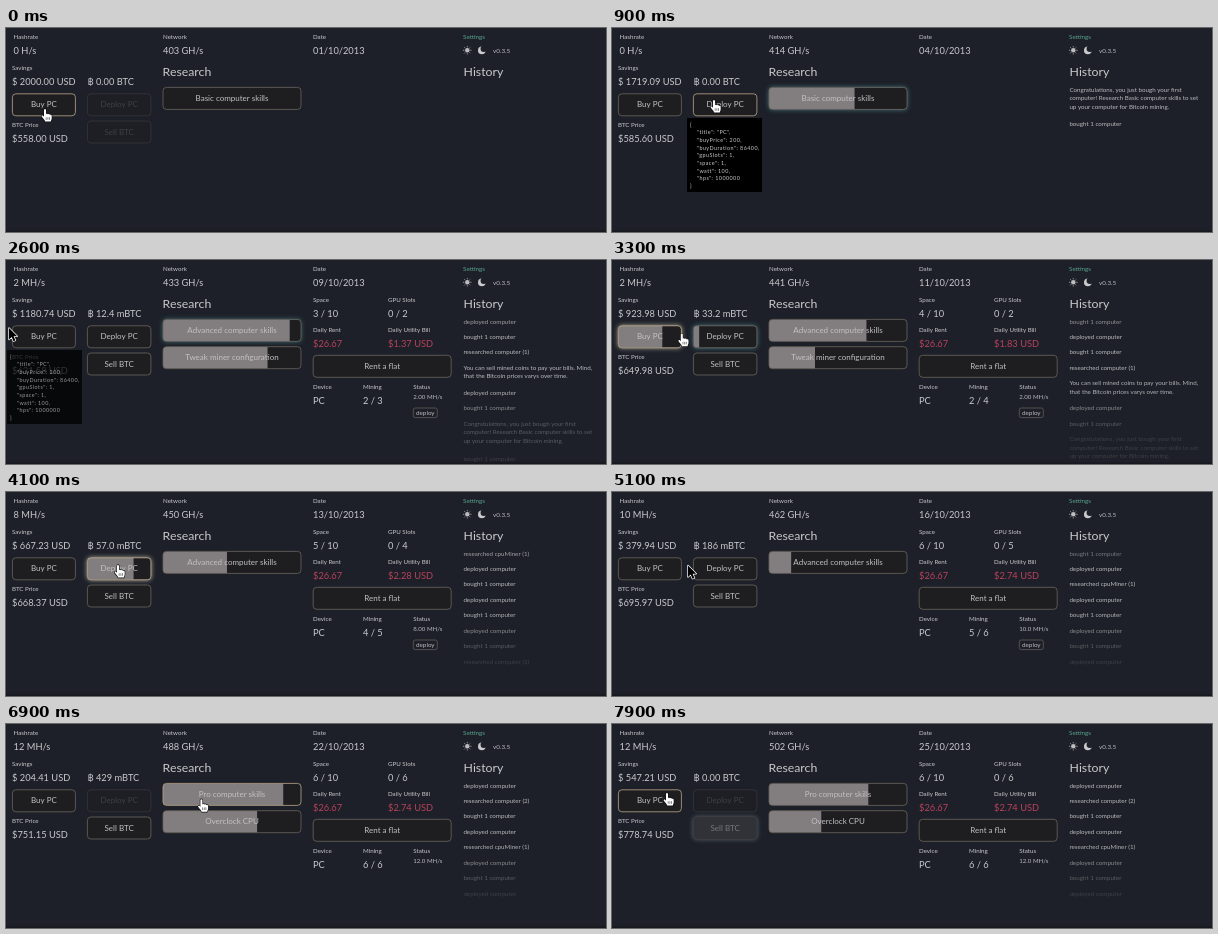
An HTML page with a canvas that plays this animation: 600x204 px, repeating every 8000 ms.

```html
<!DOCTYPE html>
<html lang="en">
<head>
<meta charset="utf-8">
<title>Mining game</title>
<style>
html, body { margin: 0; width: 100%; height: 100%; overflow: hidden; background: #1d2028; }
canvas { display: block; width: 600px; height: 204px; }
</style>
</head>
<body>
<canvas id="stage"></canvas>
<script>
const W = 600, H = 204, LOOP = 8000, DAY = 0.33;
const canvas = document.getElementById('stage');
const c = canvas.getContext('2d');
const dpr = window.devicePixelRatio || 1;
canvas.width = W * dpr;
canvas.height = H * dpr;

const FONT = 'Lato, "Open Sans", "Noto Sans", sans-serif';
const BACK = '#1d2028', LIGHT = '#c9c9cc', SOFT = '#bcbcc0', RED = '#b8425b';

const clamp = v => Math.max(0, Math.min(1, v));
const countBefore = (list, t) => list.filter(s => s <= t).length;

// Linear interpolation through [x, value, value...] points
function track(points, x, k = 1) {
  if (x <= points[0][0]) return points[0][k];
  for (let i = 1; i < points.length; i++) {
    const a = points[i - 1], b = points[i];
    if (x <= b[0]) return a[k] + (b[k] - a[k]) * (x - a[0]) / (b[0] - a[0]);
  }
  return points[points.length - 1][k];
}

// ---- Game timeline, in seconds ----
const buyClicks = [0.02, 1.41, 1.75, 2.75, 3.2, 4.6];
const deployClicks = [1.48, 2.02, 3.0, 3.45, 4.01, 5.38];
const bought = buyClicks.map(s => s + DAY);
const deployed = deployClicks.map(s => s + DAY);
const BASIC_END = 1.92, MINER_END = 3.85, ADV_END = 5.63, SELL_END = 7.83;

// button, start, duration, glow life
const jobs = [
  ...buyClicks.map(s => ['buy', s, DAY, 0.5]),
  ...deployClicks.map(s => ['deploy', s, DAY, 0.5]),
  ['basic', 0.273, 1.65, 1.0],
  ['tweak', 2.2, 1.65, 0.4],
  ['advanced', 2.33, 3.3, 0.4],
  ['overclock', 5.85, 3.3, 0.5],
  ['pro', 6.05, 6.6, 0.5],
  ['sell', 7.5, DAY, 0.6]
];

const MSG_START = ['Congratulations, you just bough your first',
  'computer! Research Basic computer skills to set', 'up your computer for Bitcoin mining.'];
const MSG_SELL = ['You can sell mined coins to pay your bills. Mind,', 'that the Bitcoin prices varys over time.'];
const log = [
  ...bought.map(s => [s, ['bought 1 computer']]),
  ...deployed.map(s => [s, ['deployed computer']]),
  [0.36, MSG_START],
  [1.87, MSG_SELL],
  [1.94, ['researched computer (1)']],
  [MINER_END, ['researched cpuMiner (1)']],
  [ADV_END, ['researched computer (2)']]
].sort((a, b) => b[0] - a[0]);

const utilPaid = [[0, 0], [3, 0.9], [6, 3.17], [8, 5.9], [12, 12.73], [18, 27.3], [24, 43.74]];
const coins = [[2.0, 0], [2.6, 12.4], [4.1, 57], [5.9, 289], [7.83, 560]];
const path = [
  [0, 38, 81], [0.06, 38, 81], [0.27, 200, 69], [0.4, 200, 69], [0.7, 101, 72], [1.3, 101, 72],
  [1.4, 40, 74], [1.5, 105, 73], [1.6, 105, 73], [1.74, 45, 75], [1.8, 45, 75], [1.9, 118, 74],
  [2, 132, 74.5], [2.2, 175, 95], [2.33, 180, 70], [2.5, 40, 73], [2.6, 3, 68], [2.75, 35, 73],
  [3, 110, 73], [3.2, 40, 74], [3.45, 112, 73], [4.1, 111, 73], [4.35, 111, 73], [4.6, 40, 74],
  [4.9, 42, 74], [5.3, 110, 73], [5.45, 110, 73], [5.8, 203, 99], [5.9, 203, 99], [6.05, 215, 69],
  [6.8, 215, 69], [7.3, 112, 100], [7.55, 112, 100], [7.85, 54, 69], [8, 54, 69]
];
const tips = [[75, 0.68, 1.34], [75, 1.84, 2.12], [1, 2.4, 2.57]];
const TIP = ['"title": "PC",', '"buyPrice": 200,', '"buyDuration": 86400,', '"gpuSlots": 1,',
  '"space": 1,', '"watt": 100,', '"hps": 1000000'];

// ---- Drawing helpers; text is centred on y ----
function text(s, x, y, size, color = LIGHT, align = 'left') {
  c.font = `${size}px ${FONT}`;
  c.fillStyle = color;
  c.textAlign = align;
  c.fillText(s, x, y + size * 0.36);
}
const label = (s, x, y) => text(s, x, y, 6.2);
const value = (s, x, y, color) => text(s, x, y, 9.3, color);

function box(x, y, w, h, r) {
  c.beginPath();
  c.roundRect(x, y, w, h, r);
}

function button(b, t, cursor) {
  const { key, name, x, y, w, on } = b, h = 22;
  const hover = on && inside(b, cursor);
  let rest = 0, glow = 0;
  for (const [k, start, dur, life] of jobs) {
    const age = t - start;
    if (k !== key || age < 0) continue;
    if (age < dur) rest = 1 - age / dur;
    if (age < life) glow = Math.max(glow, 1 - (age / life) ** 2);
  }
  if (glow) {
    c.save();
    c.globalAlpha = glow;
    c.shadowColor = hover ? '#cfc9b4' : on ? '#63b7bd' : '#9fb0bd';
    c.shadowBlur = 5 * dpr;
    c.fillStyle = c.shadowColor;
    box(x, y, w, h, 3.5);
    c.fill();
    c.restore();
  }
  box(x, y, w, h, 3.5);
  c.fillStyle = on ? '#1e1d1f' : glow ? '#303238' : '#1d1f25';
  c.fill();
  if (rest) {
    c.save();
    c.clip();
    c.fillStyle = '#827d7f';
    c.fillRect(x, y, w * rest, h);
    c.restore();
  }
  box(x, y, w, h, 3.5);
  c.lineWidth = 0.8;
  c.strokeStyle = hover ? '#b9a78b' : on ? '#6b655f' : '#36373c';
  c.stroke();
  text(name, x + w / 2, y + h / 2 - 0.3, 8, on ? '#c3c1c1' : glow ? '#77787c' : '#3e4045', 'center');
}

const inside = (b, p) => p[0] >= b.x && p[0] <= b.x + b.w && p[1] >= b.y && p[1] <= b.y + 22;

function buttons(t, owned, mining, btc) {
  const list = [
    { key: 'buy', name: 'Buy PC', x: 6.4, y: 65.8, w: 63, on: true },
    { key: 'deploy', name: 'Deploy PC', x: 81.4, y: 65.8, w: 63.5, on: owned > mining },
    { key: 'sell', name: 'Sell BTC', x: 81.4, y: 93, w: 63.5, on: btc > 0 }
  ];
  const names = { basic: 'Basic computer skills', advanced: 'Advanced computer skills',
    tweak: 'Tweak miner configuration', pro: 'Pro computer skills', overclock: 'Overclock CPU' };
  const open = t < BASIC_END ? ['basic'] : t < MINER_END ? ['advanced', 'tweak']
    : t < ADV_END ? ['advanced'] : ['pro', 'overclock'];
  open.forEach((key, i) => list.push({ key, name: names[key], x: 157, y: 59.4 + i * 27.3, w: 138, on: true }));
  if (t >= deployed[0]) list.push({ key: 'flat', name: 'Rent a flat', x: 307.2, y: 95.3, w: 138, on: true });
  return list;
}

function history(t) {
  const fade = [1, 1, 1, 1, 0.95, 0.68, 0.38, 0.2];
  let y = 61.3;
  log.filter(e => e[0] <= t).slice(0, 8).forEach(([start, lines], i) => {
    const p = clamp((t - start) / 0.3), grow = Math.min(1, p * 2);
    c.globalAlpha = p * fade[i];
    lines.forEach((s, n) => text(s, 457.4, y - (1 - grow) * 10 + n * 8.5, 6.2, SOFT));
    y += (15.45 + (lines.length - 1) * 9.7) * grow;
  });
  c.globalAlpha = 1;
}

function rig(owned, mining, rate) {
  label('Space', 307, 40);
  value(`${owned} / 10`, 307, 53.5);
  label('GPU Slots', 382, 40);
  value(`0 / ${mining}`, 382, 53.5);
  label('Daily Rent', 307, 69.7);
  value('$26.67', 307, 83.3, RED);
  label('Daily Utility Bill', 382, 69.7);
  value(`$${(owned * 0.4564).toFixed(2)} USD`, 382, 83.3, RED);
  label('Device', 307, 126.3);
  value('PC', 307, 140.3);
  label('Mining', 357, 126.3);
  value(`${mining} / ${owned}`, 357, 140.3);
  label('Status', 407.3, 126.3);
  const speed = mining * rate;
  text(`${speed.toFixed(speed < 10 ? 2 : 1)} MH/s`, 407.3, 137, 6.1, SOFT);
  if (owned > mining) {
    box(407.3, 148, 24, 9.6, 2);
    c.strokeStyle = '#6b655f';
    c.lineWidth = 0.7;
    c.stroke();
    text('deploy', 419.3, 152.6, 6.3, SOFT, 'center');
  }
}

function disc(x, y, r, color) {
  c.fillStyle = color;
  c.beginPath();
  c.arc(x, y, r, 0, 7);
  c.fill();
}

function themeIcons() {
  disc(461.3, 22.3, 2.2, SOFT);
  c.strokeStyle = SOFT;
  c.lineWidth = 0.8;
  c.beginPath();
  for (let i = 0; i < 8; i++) {
    const a = i * Math.PI / 4, dx = Math.cos(a), dy = Math.sin(a);
    c.moveTo(461.3 + dx * 3, 22.3 + dy * 3);
    c.lineTo(461.3 + dx * 4.2, 22.3 + dy * 4.2);
  }
  c.stroke();
  disc(475.8, 22.4, 3.8, LIGHT);
  disc(477.9, 20.7, 3.3, BACK);
}

function tooltip(x, alpha) {
  c.globalAlpha = alpha;
  c.fillStyle = '#000';
  c.fillRect(x, 90, 75, 74);
  c.letterSpacing = '0.45px';
  text('{', x + 3, 96.6, 5.4);
  TIP.forEach((s, i) => text(s, x + 10, 104.3 + i * 7.7, 5.4));
  text('}', x + 3, 158.2, 5.4);
  c.letterSpacing = '0px';
  c.globalAlpha = 1;
}

const ARROW = new Path2D('M0 0V11.5L2.7 9L4.5 13.2L6.4 12.4L4.6 8.3H8.2Z');
const HAND = new Path2D('M0 .9C.1-.4 1.9-.4 2 .9V5.2C2.6 4.4 3.9 4.6 4 5.4C4.7 4.7 5.8 5 6 5.9' +
  'C6.8 5.4 7.7 5.9 7.7 6.8V9.2C7.7 10.6 6.9 11.2 6.8 12.6H1.2C.9 11-1.3 9.4-2.3 7.6C-2.6 6.5-1.4 6.1-.7 6.9L0 7.7Z');

function pointer([x, y], hand) {
  c.save();
  c.translate(x, y);
  c.lineJoin = 'round';
  c.lineWidth = hand ? 1.2 : 1.4;
  c.strokeStyle = hand ? '#111' : '#fff';
  c.fillStyle = hand ? '#fff' : '#000';
  const shape = hand ? HAND : ARROW;
  c.stroke(shape);
  c.fill(shape);
  if (hand) {
    c.lineWidth = 0.5;
    c.beginPath();
    for (const k of [2.2, 3.9, 5.5]) {
      c.moveTo(k, 8.2);
      c.lineTo(k, 10.8);
    }
    c.stroke();
  }
  c.restore();
}

function draw(t) {
  const d = Math.floor(0.3 + t / DAY);
  const owned = countBefore(bought, t), mining = countBefore(deployed, t);
  const rate = t >= MINER_END ? 2 : 1;
  const sold = t >= SELL_END;
  const btc = sold ? 0 : track(coins, t);
  const savings = 2000 - 26.67 * d - 200 * owned - track(utilPaid, d) + (sold ? 431.03 : 0);
  const cursor = [track(path, t), track(path, t, 2)];

  c.setTransform(dpr, 0, 0, dpr, 0, 0);
  c.fillStyle = BACK;
  c.fillRect(0, 0, W, H);
  c.fillStyle = '#19181e';
  c.fillRect(0, 202.5, W, 1.5);

  label('Hashrate', 7.6, 8.8);
  value(mining ? `${mining * rate} MH/s` : '0 H/s', 7.6, 22.4);
  label('Network', 157, 8.8);
  value(`${Math.round(402.8 * Math.exp(0.00917 * d))} GH/s`, 157, 22.4);
  label('Date', 307, 8.8);
  value(`${String(1 + d).padStart(2, '0')}/10/2013`, 307, 22.4);
  text('Settings', 457, 8.8, 6.3, '#58a58d');
  themeIcons();
  text('v0.3.5', 487, 23, 6.3, SOFT);

  label('Savings', 6, 40);
  value(`$ ${savings.toFixed(2)} USD`, 6, 53.5);
  value('฿ ' + (btc > 0 ? `${btc.toFixed(btc < 100 ? 1 : 0)} mBTC` : '0.00 BTC'), 81.4, 53.5);
  label('BTC Price', 6, 97);
  value(`$${(558.004 + 9.1975 * d).toFixed(2)} USD`, 6, 110.8);
  text('Research', 156.6, 43.3, 12.3);
  text('History', 457.6, 43.3, 12.3);

  const list = buttons(t, owned, mining, btc);
  list.forEach(b => button(b, t, cursor));
  if (t >= deployed[0]) rig(owned, mining, rate);
  history(t);
  for (const [x, from, to] of tips) {
    const alpha = Math.min(clamp((t - from) / 0.15), 1 - clamp((t - to) / 0.12));
    if (alpha > 0) tooltip(x, alpha);
  }
  pointer(cursor, list.some(b => b.on && inside(b, cursor)));
}

const begin = performance.now();
function frame() {
  const ms = (performance.now() - begin) % LOOP;
  draw(Math.floor(ms / 100) / 10);
  requestAnimationFrame(frame);
}
frame();
</script>
</body>
</html>
```
